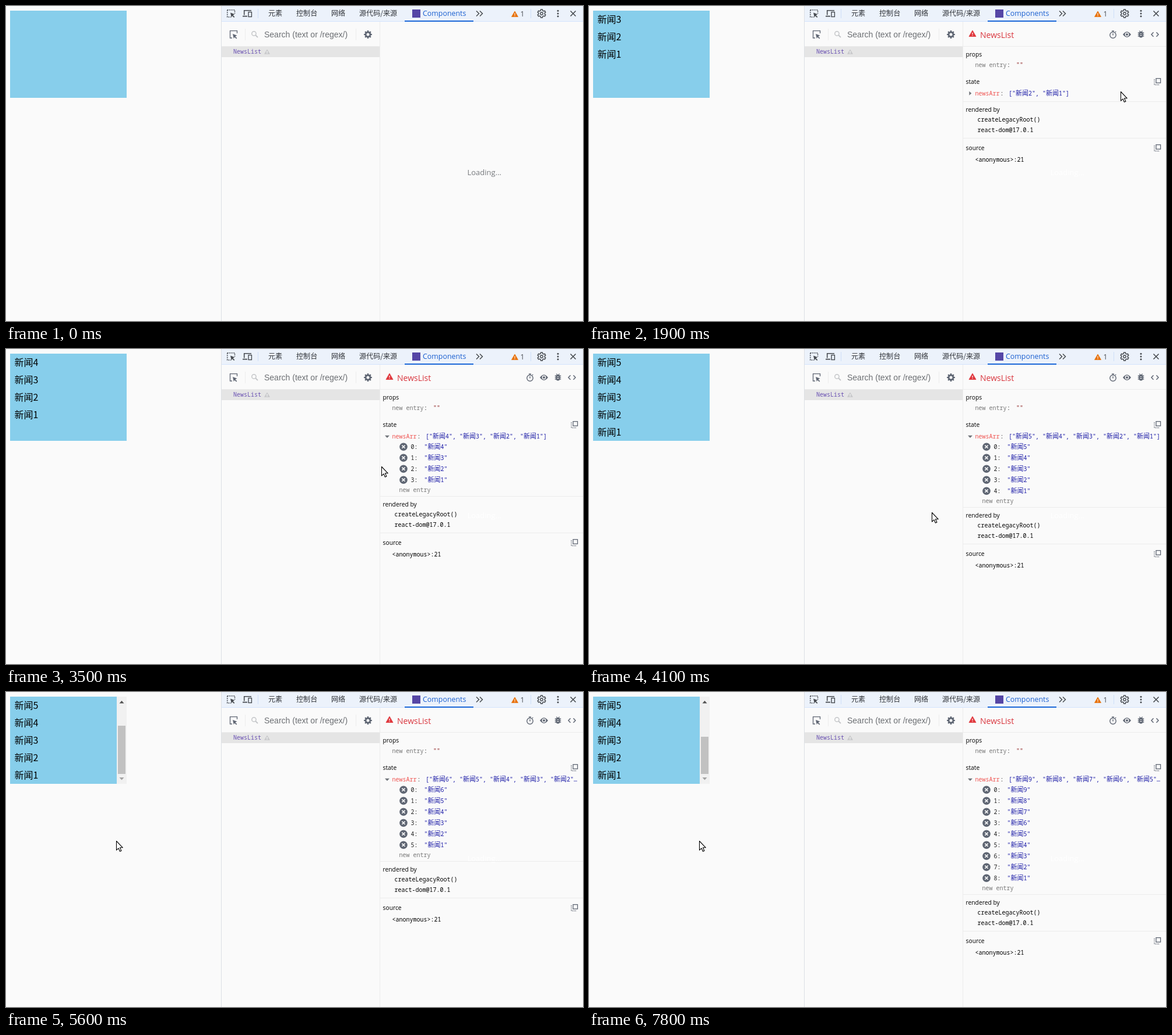
Write an HTML page that moves like this. It is 990x542 px and loops after 8 s.

```html
<!DOCTYPE html>
<html lang="zh">
<head>
<meta charset="utf-8">
<title>News list</title>
<style>
html, body { margin: 0; width: 100%; height: 100%; overflow: hidden; background: #fafafa; }
svg { display: block; }
text { white-space: pre; }
.cjk { font-family: "Noto Sans CJK SC", "Noto Sans CJK", sans-serif; }
.ui { font-family: "Open Sans", "Noto Sans", sans-serif; }
.search { font-family: "Liberation Sans", Arial, sans-serif; }
.mono { font-family: "Noto Sans Mono", "Liberation Mono", monospace; font-size: 10px; }
.mono tspan { font-family: "Noto Sans CJK SC", "Noto Sans CJK", sans-serif; font-size: 11px; }
</style>
</head>
<body>
<svg width="990" height="542" viewBox="0 0 990 542">
  <g id="base"></g>
  <g id="list"></g>
  <g id="panel"></g>
  <g id="mouse"></g>
</svg>
<script>
const LOOP = 8000, STEP = 100;
const ADDED = [100, 1000, 1900, 2800, 3700, 4700, 5600, 6500, 7400];
const LAG = 400;          // the inspector follows the page
const EXPAND = 2800;
const INK = '#474b50', SLATE = '#5f6673', BLUE = '#1a1aa6', LINE = '#ececec';

// pointer path: time, x, y
const PATH = [
  [1100, 980, 122], [1500, 919, 148], [1800, 919, 148], [1900, 912, 147],
  [2300, 770, 151], [2700, 656, 155], [2800, 656, 153], [2900, 656, 153],
  [3200, 662, 176], [3300, 662, 176], [4100, 588, 281], [4300, 540, 283],
  [4700, 290, 266], [5000, 190, 259], [5100, 190, 259], [5200, 189, 257],
  [5500, 189, 257], [5600, 189, 256]
];

const rect = (x, y, w, h, fill, extra = '') =>
  `<rect x="${x}" y="${y}" width="${w}" height="${h}" fill="${fill}" ${extra}/>`;
const fillPath = (d, fill, extra = '') => `<path d="${d}" fill="${fill}" ${extra}/>`;
const line = (d, stroke, w = 1.4, extra = '') =>
  `<path d="${d}" fill="none" stroke="${stroke}" stroke-width="${w}" ${extra}/>`;
const dot = (x, y, r, fill, extra = '') =>
  `<circle cx="${x}" cy="${y}" r="${r}" fill="${fill}" ${extra}/>`;
const ring = (x, y, r, stroke, w = 1.4) => dot(x, y, r, 'none', `stroke="${stroke}" stroke-width="${w}"`);
const text = (cls, x, y, size, fill, s) =>
  `<text class="${cls}" x="${x}" y="${y}" font-size="${size}" fill="${fill}">${s}</text>`;
const mono = (x, y, fill, s) =>
  `<text class="mono" x="${x}" y="${y}" fill="${fill}">${s.replace(/[\u4e00-\u9fff]+/g, '<tspan>$&</tspan>')}</text>`;
const at = (x, y, s) => `<g transform="translate(${x} ${y})">${s}</g>`;

function gearPath(r, teeth) {
  const pts = [];
  for (let i = 0; i < teeth; i++) {
    for (const [off, k] of [[-.3, .76], [-.2, 1], [.2, 1], [.3, .76]]) {
      const a = (i + off) / teeth * 2 * Math.PI - Math.PI / 2;
      pts.push((Math.cos(a) * r * k).toFixed(2) + ' ' + (Math.sin(a) * r * k).toFixed(2));
    }
  }
  return 'M' + pts.join('L') + 'Z';
}

const pickArrow = 'M0 0L7.5 2.8L4.4 4.3L7.3 7.2L6.1 8.4L3.2 5.5L1.8 8.2Z';
const warning = (x, y, w, h, fill) =>
  fillPath(`M${x} ${y}L${x + w / 2} ${y + h}H${x - w / 2}Z`, fill, `stroke="${fill}" stroke-width=".8" stroke-linejoin="round"`) +
  rect(x - .6, y + h * .36, 1.2, h * .31, '#fff') + rect(x - .6, y + h * .76, 1.2, 1.2, '#fff');

const copyIcon = y => at(969, y - 6,
  rect(4, .7, 7.6, 7.6, 'none', `stroke="${SLATE}" stroke-width="1.3"`) +
  line('M1 2V11.5H10', SLATE, 1.3, 'stroke-dasharray="1.4 1.3"'));

function toolbar() {
  const tabs = [[450, '元素'], [498, '控制台'], [558, '网络'], [606, '源代码/来源']];
  return rect(370, 0, 620, 26, '#ecf2fb') + rect(370, 26, 620, 1, '#d3e3fd') +
    rect(369, 0, 1, 542, '#dcdfe4') +
    line('M379.7 6.7H392.5V13M379.7 6.7V19H386', INK, 1.5, 'stroke-dasharray="2 1.5"') +
    at(385, 11.5, fillPath(pickArrow, INK)) +
    line('M408.7 15.5V7.7H421M406 17.6H414', INK, 1.6) +
    rect(416, 10.5, 5.4, 8, '#ecf2fb', `stroke="${INK}" stroke-width="1.4"`) +
    rect(432, 5, 1, 16, '#cfdff8') + rect(900, 5, 1, 16, '#cfdff8') +
    tabs.map(([x, s]) => text('cjk', x, 17, 12.1, '#303338', s)).join('') +
    rect(697, 6, 14, 14, '#5546a6') +
    text('ui', 715, 17, 12.4, '#1a5fd0', 'Components') +
    rect(684, 25, 118, 2, '#1a67d8') +
    line('M807 8.5L811.5 13L807 17.5M813 8.5L817.5 13L813 17.5', INK, 1.5) +
    warning(873, 9, 11, 9.5, '#e8710a') +
    text('ui', 882.5, 17.5, 12, INK, '1') +
    at(919, 13, line(gearPath(7.2, 6), INK, 1.5, 'stroke-linejoin="round"') + ring(0, 0, 2.2, INK)) +
    [8.3, 13, 17.7].map(y => dot(947, y, 1.5, INK)).join('') +
    line('M968.5 8.5L977.5 17.5M977.5 8.5L968.5 17.5', INK, 1.6);
}

function tree() {
  return line('M388 55H384.5V42.7H396.5V47', SLATE, 1.3) +
    at(389, 48, fillPath(pickArrow, SLATE)) +
    rect(410, 39, 1, 20, LINE) + rect(600, 39, 1, 20, LINE) +
    ring(425.4, 47.4, 3.6, '#c4c6c9', 1.5) + line('M428 50L432 54', '#c4c6c9', 1.8) +
    text('search', 443, 54, 14, '#6c6f73', 'Search (text or /regex/)') +
    at(621, 49, fillPath(gearPath(7, 8), SLATE) + dot(0, 0, 2.5, '#fafafa')) +
    rect(370, 69, 271, 1, LINE) + rect(370, 70, 271, 18, '#e5e5e5') +
    mono(390, 82, '#6a51b2', 'NewsList') +
    warning(448, 75, 9, 7.5, '#c9cacc') +
    rect(641, 27, 1, 515, LINE);
}

function header() {
  let bug = '';
  for (const y of [46.2, 49, 51.8]) bug += `M941.8 ${y}H952.2`;
  return warning(658, 42, 12, 10.5, '#e0363c') +
    text('ui', 671, 55, 14, '#d9363e', 'NewsList') +
    ring(899, 50, 5.2, SLATE, 1.4) + line('M897 43H901M899 47V50.5M903 45L904.2 43.8', SLATE, 1.4) +
    fillPath('M916 49Q923 39.4 930 49Q923 58.6 916 49Z', SLATE) + dot(923, 49, 3.4, '#fafafa') + dot(923, 49, 2, SLATE) +
    rect(943.6, 44, 6.8, 10.4, SLATE, 'rx="3.4"') + line(bug, SLATE, 1.4) +
    line('M944.4 42.6L946 44.4M949.6 42.6L948 44.4', SLATE, 1.2) +
    line('M945.7 47.8H948.3M945.7 50.6H948.3', '#fafafa', 1.1) +
    line('M968.5 45.3L965 49L968.5 52.7M973.5 45.3L977 49L973.5 52.7', SLATE, 1.5) +
    rect(642, 69, 348, 1, LINE);
}

const names = (n, max = n) => Array.from({ length: Math.min(n, max) }, (_, i) => '新闻' + (n - i));

function list(n) {
  let s = rect(7, 8, 200, 150, '#87ceeb');
  names(Math.min(n, 5)).forEach((v, i) => s += text('cjk', 14.5, 29 + 30 * i, 16, '#000', v));
  if (n > 5) {
    const size = 116 * 150 / (30 * n);
    s += rect(190, 8, 17, 150, '#f1f1f1') +
      rect(192, Math.round(141 - size), 13, Math.round(size), '#c1c1c1') +
      fillPath('M194.5 19.5L198.5 15L202.5 19.5Z', '#505050') +
      fillPath('M194.5 147L198.5 151.5L202.5 147Z', '#a3a3a3');
  }
  return s;
}

function panel(n, open) {
  if (!n) return text('ui', 791.5, 291, 13, '#76797d', 'Loading...');
  const label = (y, s) => text('ui', 646.5, y, 10.3, '#000', s);
  const preview = '[' + names(n, 5).map(v => `"${v}"`).join(', ') + (n > 5 ? '…' : ']');
  const end = open ? 177 + 19 * n : 164;
  let s = text('ui', 791.5, 291, 13, '#fff', 'Loading...') + header() +
    label(87, 'props') + mono(662.5, 105, '#777', 'new entry') +
    mono(717, 105, '#333', ':') + mono(733, 105, '#8a1c1c', '""') +
    label(134, 'state') + copyIcon(130) +
    fillPath(open ? 'M650 148.8H658L654 153Z' : 'M652.3 146.8V153.8L656.3 150.3Z', '#70747a') +
    mono(662.5, 154, '#ef5350', 'newsArr') + mono(705.5, 154, '#444', ':') +
    mono(720, 154, BLUE, preview);
  if (open) {
    names(n).forEach((v, i) => {
      const y = 168.2 + 19 * i;
      s += dot(682, y, 6.8, SLATE) +
        line(`M679.4 ${y - 2.6}l5.2 5.2m0 -5.2l-5.2 5.2`, '#fff', 1.5) +
        mono(694.5, y + 4, '#222', i + ':') + mono(717.5, y + 4, BLUE, `"${v}"`);
    });
    s += mono(674.5, 169.5 + 19 * n, '#777', 'new entry');
  }
  return s + rect(642, end, 348, 1, LINE) + label(end + 18, 'rendered by') +
    mono(666.5, end + 35, '#000', 'createLegacyRoot()') +
    mono(666.5, end + 53, '#000', 'react-dom@17.0.1') +
    rect(642, end + 63, 348, 1, LINE) + label(end + 84, 'source') + copyIcon(end + 80) +
    mono(662.5, end + 104, '#000', '&lt;anonymous&gt;:21');
}

function mouse(t) {
  if (t < PATH[0][0]) return '';
  let i = PATH.findIndex(p => p[0] > t);
  if (i < 0) i = PATH.length;
  const a = PATH[i - 1], b = PATH[i] || a;
  const k = b === a ? 0 : (t - a[0]) / (b[0] - a[0]);
  const x = Math.round(a[1] + (b[1] - a[1]) * k), y = Math.round(a[2] + (b[2] - a[2]) * k);
  const edge = 'stroke="#000" stroke-width="1.1" stroke-linejoin="round"';
  if (t >= 2700 && t < 3000) {
    return at(x, y, fillPath('M-1 15.5V2Q-1 .5 .7 .5Q2.4 .5 2.4 2V8Q5.4 7 5.6 9Q8.2 8 8.5 10Q11 9.4 11 12V17Q11 19 9 21.5V23.5H.5V21.5L-4.4 14.5Q-5.4 12.6 -4 12Q-2.9 11.6 -1 14.2Z', '#fff', edge) +
      line('M2.4 8V12.5M5.6 9V12.5M8.5 10V13', '#000', 1));
  }
  return at(x, y, fillPath('M.5 .5V16.2L4 12.8L6.4 18.3L8.9 17.2L6.5 11.8H11.3Z', '#fff', edge));
}

const shown = {};
function put(id, html) {
  if (shown[id] === html) return;
  shown[id] = html;
  document.getElementById(id).innerHTML = html;
}

function draw(now) {
  const t = Math.floor(now % LOOP / STEP) * STEP;
  const count = time => ADDED.filter(a => a <= time).length;
  put('list', list(count(t)));
  put('panel', panel(count(t - LAG), t >= EXPAND));
  put('mouse', mouse(t));
}

put('base', rect(0, 0, 990, 542, '#fafafa') + toolbar() + tree());
draw(0);
let start;
function tick(now) {
  start ??= now;
  draw(now - start);
  requestAnimationFrame(tick);
}
requestAnimationFrame(tick);
</script>
</body>
</html>
```
